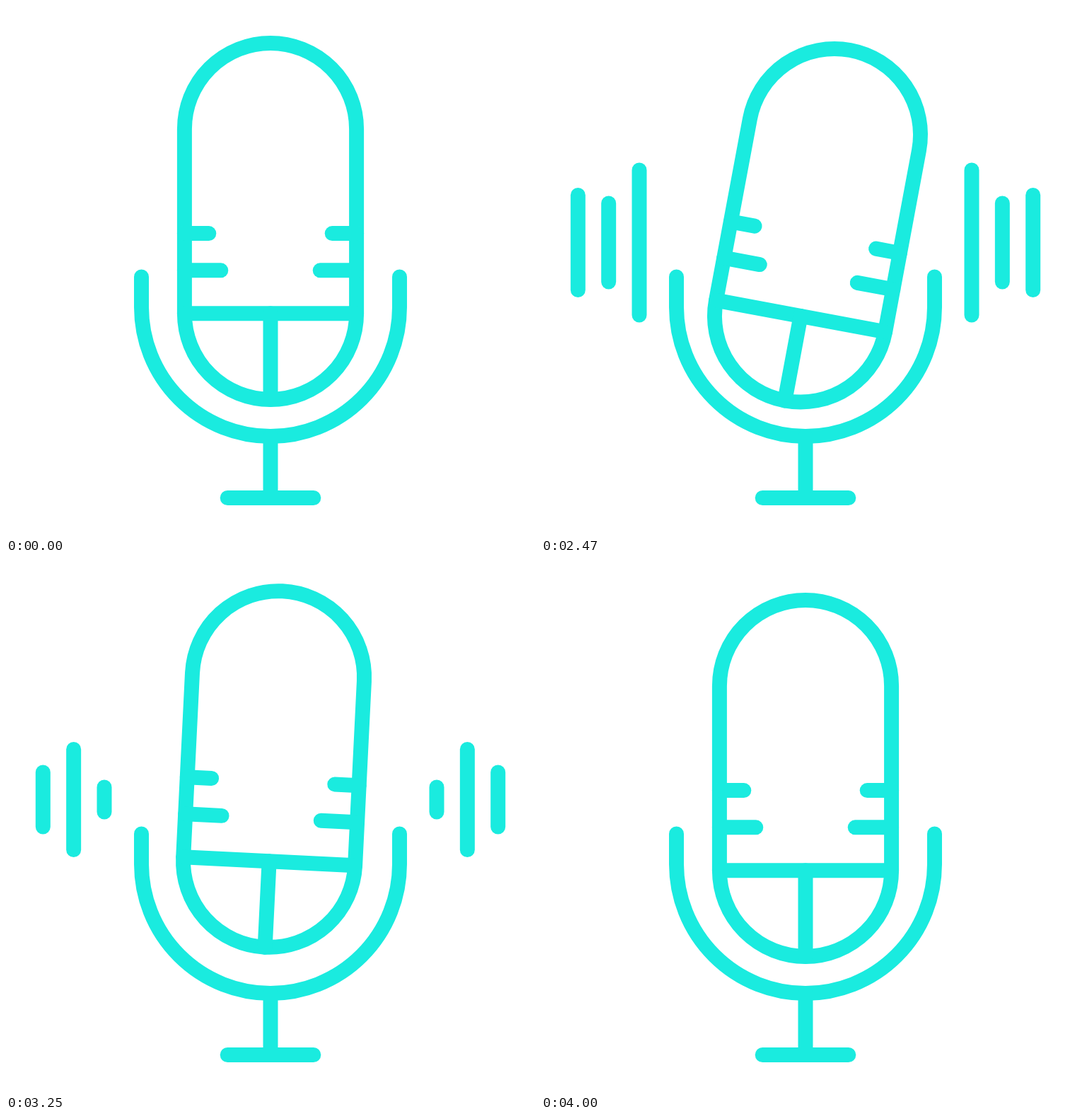
Animation, 748 px wide and 748 px high, one loop 4.02 s. Source, as an HTML page with a canvas:

```html
<!DOCTYPE html>
<html lang="en">
<head>
<meta charset="utf-8">
<title>Microphone</title>
<style>
html, body { margin: 0; width: 100%; height: 100%; overflow: hidden; background: #fff; }
canvas { display: block; width: 748px; height: 748px; }
</style>
</head>
<body>
<canvas id="stage" width="748" height="748"></canvas>
<script>
const ctx = document.getElementById('stage').getContext('2d');
const LOOP = 4020, START = 2020, END = 4000;
const CX = 374, PIVOT = 397, BAR_Y = 334.5, BAR_GAP = 43.35, WIDTH = 21, R = 121.6;

// The body swings from one pose to the next on an even beat
const SWING = 1930, BEAT = 333;
const lift = [-6, 53, -18, 47, -13.2, 17.2, 0];
const tilt = [-0.5, 0, 15.4, 9.4, 2.8, -0.4, 0];

// Half heights of the sound bars at shared moments, outermost bar first
const moments = [START, 2470, 3000, 3250, 3620, END];
const bars = [
  [14.5, 77.5, 84.5, 49, 20.5, 11],
  [23.5, 66, 53.5, 81.5, 72, 11],
  [18, 113, 52.5, 28, 59.5, 11]
];

// Eased value at a fractional position in a list of poses
function tween(values, pos) {
  const i = Math.max(0, Math.min(values.length - 2, Math.floor(pos)));
  const p = Math.max(0, Math.min(1, pos - i));
  return values[i] + (values[i + 1] - values[i]) * (1 - Math.cos(Math.PI * p)) / 2;
}

function momentAt(t) {
  const i = moments.findIndex(m => m > t) - 1;
  return i + (t - moments[i]) / (moments[i + 1] - moments[i]);
}

function line(x1, y1, x2, y2) {
  ctx.beginPath();
  ctx.moveTo(x1, y1);
  ctx.lineTo(x2, y2);
  ctx.stroke();
}

function drawStand() {
  ctx.beginPath();
  ctx.moveTo(191.5, 383);
  ctx.lineTo(191.5, 426);
  ctx.arc(CX, 426, 182.5, Math.PI, 0, true);
  ctx.lineTo(556.5, 383);
  ctx.stroke();
  line(CX, 608.5, CX, 695.5);
  line(313.2, 695.5, 434.8, 695.5);
}

function drawBody(dy, angle) {
  ctx.save();
  ctx.translate(CX, PIVOT + dy);
  ctx.rotate(angle * Math.PI / 180);
  ctx.translate(-CX, -PIVOT);
  ctx.beginPath();
  ctx.arc(CX, 174, R, Math.PI, 0);
  ctx.arc(CX, 434.8, R, 0, Math.PI);
  ctx.closePath();
  ctx.stroke();
  line(CX - R, 434.8, CX + R, 434.8);
  line(CX, 434.8, CX, 556.4);
  for (const side of [-1, 1]) {
    line(CX + side * R, 321.6, CX + side * 87.2, 321.6);
    line(CX + side * R, 373.8, CX + side * 70.2, 373.8);
  }
  ctx.restore();
}

function drawBars(t) {
  const pos = momentAt(t);
  bars.forEach((heights, i) => {
    const x = 52.3 + i * BAR_GAP;
    const h = tween(heights, pos) - WIDTH / 2;
    line(x, BAR_Y - h, x, BAR_Y + h);
    line(2 * CX - x, BAR_Y - h, 2 * CX - x, BAR_Y + h);
  });
}

function draw(time) {
  const t = time % LOOP;
  ctx.fillStyle = '#fff';
  ctx.fillRect(0, 0, 748, 748);
  ctx.strokeStyle = '#1aebdf';
  ctx.lineWidth = WIDTH;
  ctx.lineCap = 'round';
  drawStand();
  if (t >= START && t < END) {
    const pos = (t - SWING) / BEAT;
    drawBody(tween(lift, pos), tween(tilt, pos));
    drawBars(t);
  } else {
    drawBody(0, 0);
  }
}

let begin = null;
function frame(now) {
  if (begin === null) begin = now;
  draw(now - begin);
  requestAnimationFrame(frame);
}
draw(0);
requestAnimationFrame(frame);
</script>
</body>
</html>
```
